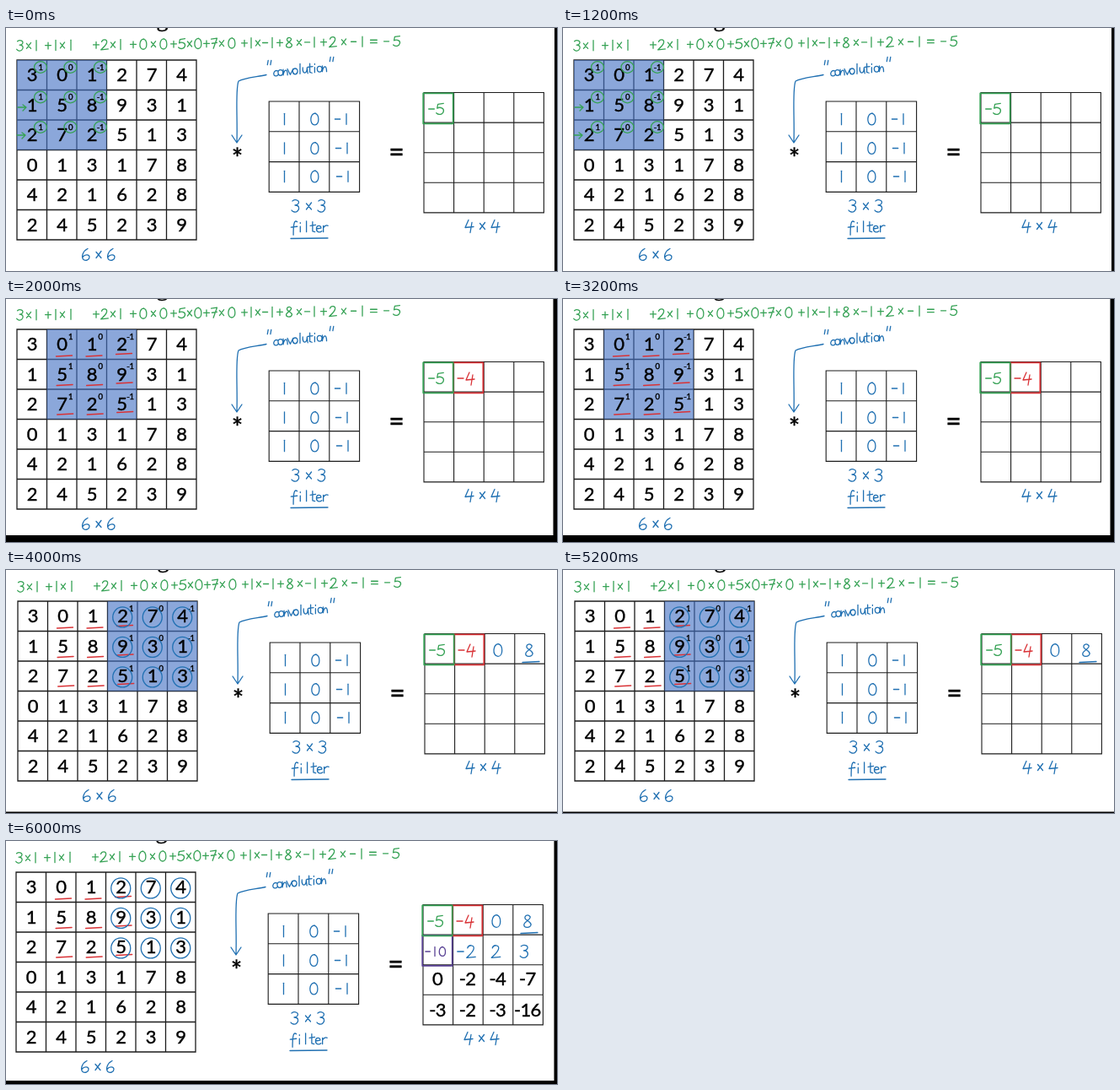
An HTML page for the animation above (8000 ms loop, 654 px wide and 288 px high).

```html
<!DOCTYPE html>
<html lang="en">
<head>
<meta charset="utf-8">
<title>Convolution by hand</title>
<style>
html, body { margin: 0; width: 100%; height: 100%; overflow: hidden; background: #fff; }
svg { display: block; width: 654px; height: 288px; }
text {
  font-family: Lato, "Open Sans", sans-serif; text-anchor: middle;
  stroke: #000; stroke-width: 0.4; letter-spacing: -0.03em;
}
.ink path { vector-effect: non-scaling-stroke; }
.ink { fill: none; stroke-width: 1.3; stroke-linecap: round; stroke-linejoin: round; }
</style>
</head>
<body>
<svg id="stage" viewBox="0 0 654 288"></svg>
<script>
const GREEN = '#36a255', BLUE = '#2070b2', RED = '#d93236', PURPLE = '#594294';
const CELL = 35.5, LEFT = 13, TOP = 38;
const OUT = { x: 496, y: 76.5, cell: 35.6 };
const STEP_MS = 2000;

// Pen strokes around a centre point, about 10 wide and 14 high.
const GLYPHS = {
  0: 'M1-7C-6-8-7 7 0 7C6 7 6-6 0-7',
  1: 'M0-7L0 7',
  2: 'M-4-4C-3-8 4-8 3-3C2 1-3 5-5 7L5 6',
  3: 'M-4-6C0-9 5-6 3-3C2-1 0-1-1-1C4-1 5 3 2 6C0 8-4 7-5 5',
  4: 'M-1-7L-5 2L5 1M3-4L1 8',
  5: 'M4-7L-3-6L-4-1C0-3 5-1 4 3C3 7-2 8-5 5',
  6: 'M2-7C-4-4-6 3-3 6C0 8 4 6 4 3C4 0-1-1-4 3',
  7: 'M-4-6L4-7L-1 7M-3 0L4-1',
  8: 'M3-5C0-9-5-5-2-2C0 0 4 1 4 4C3 8-4 8-4 4C-4 1 4-2 3-5',
  x: 'M-3-3L3 4M3-4L-3 4',
  '+': 'M-4 0L4 0M0-4L0 5',
  '-': 'M-4 0L3 0',
  '=': 'M-4-2L5-2M-4 2L5 2',
  '"': 'M-2-3L-3 3M2-3L1 3',
  c: 'M3-3C-1-5-4 0-2 3C0 5 2 4 4 2',
  o: 'M0-4C-5-4-4 4 0 4S5-4 0-4',
  n: 'M-3-4L-3 4C-2-3 3-7 3 4',
  v: 'M-4-4L0 4L4-4',
  l: 'M0-10L0 4',
  u: 'M-3-4C-4 6 3 5 3-4L4 4',
  t: 'M0-9L0 3L3 4M-3-4L4-5',
  i: 'M0-3L0 4M0-7L0-8',
  f: 'M4-9C0-12-1-6-1 8M-4-2L4-3',
  e: 'M-3 0L3-1C3-5-3-5-3 0C-3 5 2 5 4 3',
  r: 'M-2-4L-2 4M-2-1C-1-4 2-5 4-4'
};

const stage = document.getElementById('stage');

function add(parent, tag, attrs, content) {
  const el = document.createElementNS('http://www.w3.org/2000/svg', tag);
  for (const key in attrs) el.setAttribute(key, attrs[key]);
  if (content !== undefined) el.textContent = content;
  parent.appendChild(el);
  return el;
}

const scene = add(stage, 'g', {});
const timed = [];

// A group that is visible only during the given steps.
function layer(steps, attrs = {}) {
  const el = add(scene, 'g', attrs);
  timed.push({ el, steps });
  return el;
}

const pen = (color, steps = [0, 1, 2, 3]) => layer(steps, { class: 'ink', stroke: color });

function print(parent, str, x, y, size = 22) {
  add(parent, 'text', { x, y, 'font-size': size }, str);
}

// xs: one centre per character, or a [start, gap] pair; slope tilts the line.
function write(parent, str, xs, y, scale = 1, slope = 0) {
  [...str].forEach((ch, i) => {
    const x = xs.length === str.length ? xs[i] : xs[0] + i * xs[1];
    const dy = y + slope * (x - xs[0]);
    add(parent, 'path', { d: GLYPHS[ch], transform: `translate(${x} ${dy}) scale(${scale})` });
  });
}

function grid(x, y, cell, n, width) {
  let d = '';
  for (let i = 0; i <= n; i++) {
    d += `M${x} ${y + i * cell}h${n * cell}M${x + i * cell} ${y}v${n * cell}`;
  }
  add(scene, 'path', {
    d, fill: 'none', stroke: '#1c1c1c', 'stroke-width': width, 'stroke-linecap': 'square'
  });
}

function eachOfNine(fn) {
  for (let r = 0; r < 3; r++) for (let c = 0; c < 3; c++) fn(r, c);
}

// Printed parts
add(scene, 'text', {
  x: 185, y: -2.5, 'font-size': 28, style: 'font-family: "Liberation Serif", serif'
}, 'g');
grid(LEFT, TOP, CELL, 6, 1.3);
grid(312.2, 87, 35.8, 3, 1.1);
grid(OUT.x, OUT.y, OUT.cell, 4, 1.1);
print(scene, '*', 274, 165.5, 32);
print(scene, '=', 463, 157.5, 32);

// Sliding window
[0, 1, 3].forEach((col, step) => {
  const win = layer([step]);
  const x = LEFT + col * CELL;
  add(win, 'rect', {
    x, y: TOP, width: 3 * CELL, height: 3 * CELL, fill: '#4472c4', 'fill-opacity': 0.62
  });
  eachOfNine((r, c) => print(win, 1 - c, x + c * CELL + 28, TOP + r * CELL + 11.5, 9.5));
});

['301274', '158931', '272513', '013178', '421628', '245239'].forEach((row, r) =>
  [...row].forEach((n, c) =>
    print(scene, n, LEFT + (c + 0.5) * CELL, TOP + r * CELL + 25.3)));

// Marks on the input
const rings = pen(GREEN, [0]);
eachOfNine((r, c) => add(rings, 'ellipse', {
  cx: LEFT + c * CELL + 28, cy: TOP + r * CELL + 8.5, rx: 7.5, ry: 6.8
}));
add(rings, 'path', { d: 'M14 94H24M20 91L24 94L20 98M13 127H23M19 124L23 127L19 131' });

const underlines = pen(RED, [1, 2, 3]);
eachOfNine((r, c) => add(underlines, 'path', {
  d: `M${59.5 + c * 35.5 + r * 0.6} ${70 + r * 34.5 - (c === 2 ? 2.5 : 0)}l19-1`
}));

const circles = pen(BLUE, [2, 3]);
eachOfNine((r, c) => add(circles, 'ellipse', {
  cx: LEFT + (c + 3.5) * CELL, cy: TOP + (r + 0.5) * CELL + 1.2, rx: 11.5, ry: 12
}));

// Handwriting
write(pen(GREEN), '3x1+1x1+2x1+0x0+5x0+7x0+1x-1+8x-1+2x-1=-5', [
  17, 27, 36, 50, 59, 67, 77, 107, 117, 127, 136, 151, 163, 175, 187, 199, 209, 218, 228, 238, 247,
  256, 268, 283, 291, 299, 308, 316, 325, 336, 348, 358, 366, 377, 388, 401, 413, 423, 436, 452, 464
], 21, 0.86, -0.012);

const notes = pen(BLUE);
write(notes, '"', [313], 41, 0.9);
write(notes, 'convolution', [320, 5.8], 53.5, 0.85, -0.09);
write(notes, '"', [387], 37, 0.9);
add(notes, 'path', { d: 'M309 55.5C298 58 283 59 276 63C272 72 275 108 274 135M268 127L274 136L280 127' });
[108, 142.5, 176].forEach((y, i) => {
  write(notes, '1', [330.5], y, 0.95);
  write(notes, '0', [366.5], y, 0.98);
  write(notes, '-1', [394 + i, 404 + i], y, 0.9);
});
write(notes, '3x3', [344, 15.5], 211);
write(notes, 'filter', [342, 7.3], 238, 0.92);
add(notes, 'path', { d: 'M338 249.5L382 249' });
write(notes, '6x6', [95, 15], 268.5);
write(notes, '4x4', [550, 15.5], 234.5);

// Results
const outBox = (parent, c, r) => add(parent, 'rect', {
  x: OUT.x + c * OUT.cell - 0.8, y: OUT.y + r * OUT.cell + 0.8, width: 35.5, height: 36,
  'stroke-width': 1.7
});

const third = pen(PURPLE, [3]);
outBox(third, 0, 1);
write(third, '-10', [502, 510, 519], 132, 0.78);

const second = pen(RED, [1, 2, 3]);
outBox(second, 1, 0);
write(second, '-4', [540, 551], 96);

const first = pen(GREEN);
outBox(first, 0, 0);
write(first, '-5', [505.5, 515.5], 96, 0.95);

const topRow = pen(BLUE, [2, 3]);
write(topRow, '08', [583, 620], 96, 1.05);
add(topRow, 'path', { d: 'M612 110.5L632 109.5' });
write(pen(BLUE, [3]), '-223', [541, 553, 582.5, 616.5], 132, 1.05);

const printed = layer([3]);
[[0, -2, -4, -7], [-3, -2, -3, -16]].forEach((row, r) =>
  row.forEach((n, c) => print(printed, n,
    OUT.x + (c + 0.5) * OUT.cell - 0.8, OUT.y + (r + 2) * OUT.cell + 24.5 + r)));

// Camera shift and black edge for each step
const right = add(stage, 'rect', { y: 0, width: 6, height: 288, x: 651 });
const bottom = add(stage, 'rect', { x: 0, width: 654, height: 8 });
const views = [
  { shift: '0 0', right: 651, bottom: 288 },
  { shift: '0 -2', right: 649.5, bottom: 280 },
  { shift: '1 -1', right: 654, bottom: 286.5 },
  { shift: '-1 -1', right: 650.5, bottom: 284 }
];

let shown = -1;
function draw(now) {
  const step = Math.floor(now / STEP_MS) % views.length;
  if (step !== shown) {
    shown = step;
    const view = views[step];
    scene.setAttribute('transform', `translate(${view.shift})`);
    right.setAttribute('x', view.right);
    bottom.setAttribute('y', view.bottom);
    timed.forEach(({ el, steps }) => {
      el.style.display = steps.includes(step) ? '' : 'none';
    });
  }
}

const start = performance.now();
function tick() {
  draw(performance.now() - start);
  requestAnimationFrame(tick);
}
tick();
</script>
</body>
</html>
```
